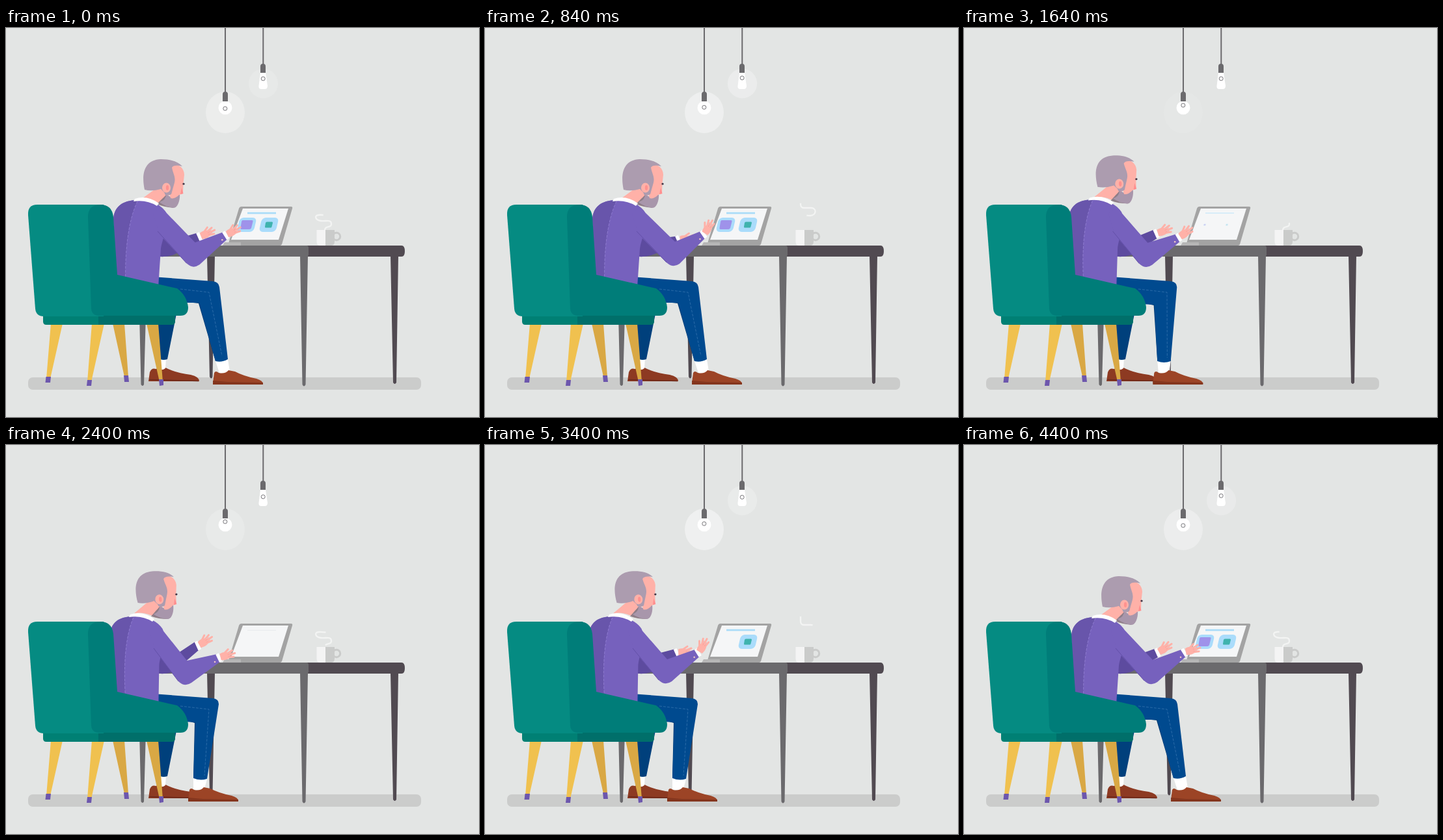
These frames come from a looping animation (727 by 599 pixels, 4.48 s). An HTML page:

```html
<!DOCTYPE html>
<html lang="en">
<head>
<meta charset="utf-8">
<title>Working at a laptop</title>
<style>
html, body { margin: 0; width: 100%; height: 100%; overflow: hidden; background: #e3e5e4; }
svg { display: block; width: 100vw; height: 100vh; }
.gray { fill: #6b6a6d; }
.dark { fill: #514a51; }
.skin { fill: #ffb1a8; }
.wool { fill: #7661bd; }
.wool2 { fill: #5d4b9f; }
.white { fill: #fff; }
.line { fill: none; }
</style>
</head>
<body>
<svg viewBox="0 0 727 599">
  <defs>
    <g id="hand" stroke="#ffb1a8" stroke-width="3" stroke-linecap="round">
      <path class="skin" stroke="none" d="M0 -5C5 -7 10 -6 13 -4L14 4C9 7 4 6 0 5Z"/>
      <path d="M5 -3L14 -9M9 -2L20 -6M10 0L23 -1M10 3L20 4"/>
      <path stroke="#f59a94" stroke-width=".7" d="M12 -1L18 -3M12 2L18 1.5"/>
    </g>
    <g id="icon" transform="skewX(-13)">
      <rect x="-13" y="-11" width="26" height="22" rx="6" fill="#aadcfb"/>
    </g>
  </defs>

  <rect x="34" y="538" width="604" height="19" rx="7" fill="#cbcccb"/>

  <!-- lamps -->
  <ellipse id="glowL" class="white" cx="337" cy="130" rx="30" ry="32"/>
  <circle id="glowR" class="white" cx="395.5" cy="85.5" r="22.7"/>
  <path stroke="#6b6a6d" stroke-width="2" d="M337 0V100M395.3 0V58"/>
  <path class="gray" d="M333 115V102Q333 98 337 98T341 102V115ZM391 70V59Q391 55 395 55T399 59V70Z"/>
  <path class="white" d="M333 113H341L345 116A10.5 10.5 0 1 1 329 116Z"/>
  <path class="white" d="M391 69H399L402 89Q402 94 398 94H392Q388 94 388.5 89Z"/>
  <g fill="none" stroke="#77767a"><circle id="ringL" cx="336.8" r="3"/><circle id="ringR" cx="395.2" r="3"/></g>

  <!-- table -->
  <path class="dark" d="M309 350H321L317.5 537Q315.500 542 313 537ZM591 350H603L600 546Q597.500 550 595 546Z"/>
  <path fill="#8d3a22" d="M219 544L221 530Q224 523 230 525L243 522Q260 531 284 534Q297 537 297 544Z"/>
  <path stroke="#6c2819" stroke-width="1.500" d="M220 541.500L296 543.500"/>
  <path class="white" d="M237 508H246L245 524Q240 528 235 525Z"/>
  <path fill="#00407c" d="M232 435H263L248 510Q242 512 237 510Z"/>
  <path class="dark" d="M460 335H608Q613 335 613 343.500T608 352H460Z"/>
  <path class="gray" d="M228 335H462Q465 335 465 339V348Q465 352 462 352H228ZM452 350H464L460.500 549Q458 554 455.500 549ZM205 440H215L212 549Q210 553 207.500 549Z"/>

  <!-- cup and steam -->
  <path id="steam" class="line" stroke="#f3f4f3" stroke-width="2.300" pathLength="121" d="M490 312C490 303 500 309 500 302C500 294 492 298 484 297C476 296 473 289 480 288C485 287 492 289 500 289C510 288 510 277 501 277H490Q485 277 485 271V264"/>
  <circle cx="508" cy="321" r="5.700" fill="none" stroke="#cacbca" stroke-width="3"/>
  <path fill="#cacbca" d="M490 311H505V329Q505 335 499 335H490Z"/>
  <path fill="#f4f4f4" d="M477.500 311H491V335H483Q477.500 335 477.500 329Z"/>

  <!-- laptop -->
  <path fill="#a3a3a3" d="M362 275H438Q441 275 440 278L424 333Q423 335 421 335H341L358 278Q359 275 362 275Z"/>
  <path fill="#f5f6f7" d="M364 278H434L419 326H346Z"/>
  <path fill="#b6b6b6" d="M336 330H361V335H333Z"/>
  <rect id="title" x="371" width="44"/>
  <g id="iconL"><use href="#icon"/><path fill="#9f92ea" d="M-6 -7H8Q10 -7 9.500 -5L7 5Q6 7 4 7H-8Q-10 7 -9.500 5L-8 -5Q-7.500 -7 -6 -7Z"/></g>
  <g id="iconR"><use href="#icon"/><path fill="#3fb3ae" d="M-3 -4.500H5Q6 -4.500 6 -3L4.500 3Q4 4.500 3 4.500H-5Q-6 4.500 -6 3L-5 -3Q-4.500 -4.500 -3 -4.500Z"/></g>

  <!-- far arm -->
  <path id="farArm" class="wool2"/>
  <path id="farCuff" class="white"/>
  <use id="farHand" href="#hand"/>

  <!-- near leg -->
  <path id="sock" class="white"/>
  <path id="shade" fill="#003b74"/>
  <path id="leg" fill="#004a8f"/>
  <path id="seam" class="line" stroke="#2a6aa8" stroke-dasharray="4 2"/>
  <g id="shoe">
    <path fill="#9c4426" d="M318 547L320 531Q322 527 327 531Q337 533 342 527L352 529Q365 536 385 540Q395 543 395 548Z"/>
    <path fill="#84351d" d="M318 543L341 545L395 546V549H342L341 549H318Z"/>
  </g>

  <!-- body -->
  <g id="torso">
    <path class="wool" d="M165 295C166 276 178 265 202 265C222 264 239 272 246 284C252 300 240 325 238 340L234 400H170Z"/>
    <path fill="#6855ab" d="M165 295C166 276 178 265 203 265C188 295 182 340 184 400H170Z"/>
    <path class="line" stroke="#8d7ace" stroke-dasharray="4 2" d="M202 267C188 296 182 345 184 400"/>
  </g>
  <g id="head">
    <path class="skin" d="M206 265L232 246L255 250L240 274Q222 262 206 265Z"/>
    <path fill="#8f7e88" d="M232 271L246 257L256 262L258 277Q243 276 232 271Z"/>
    <path fill="#a896ab" d="M246 256L256 262L267 256C268 264 264 278 257 277Q244 275 236 268Q246 265 246 256Z"/>
    <path class="skin" d="M250 212C262 206 274 214 274 226L272.500 240L272 255Q268 256 266 257Q259 264 253 262L250 250Z"/>
    <path fill="#ff8f8f" d="M270 246L272.500 255L268 256Z"/>
    <path fill="#ac9caf" d="M213 249C208 225 212 203 238 202C254 202 265 206 271 213C263 211 257 211 255 215C257 225 261 229 259 238L254 256Q247 260 241 254L238 248Q224 252 213 249Z"/>
    <ellipse class="skin" cx="246.500" cy="246" rx="6.500" ry="7.500"/>
    <ellipse fill="#ff928f" cx="248" cy="246" rx="2.200" ry="4"/>
    <path class="skin" d="M238 248L243 253Q246 258 242 261L230 265L222 256Z"/>
    <ellipse fill="#403344" cx="273" cy="240" rx="1.700" ry="1.500"/>
  </g>
  <path id="collar" class="white" d="M198 263Q217 257 235 270L232 274Q216 264 196 267Z"/>

  <!-- near arm -->
  <path id="arm" class="wool"/>
  <path id="armLine" class="line" stroke="#6350a8"/>
  <path id="cuff" class="white"/>
  <circle id="button" r="1.300" fill="#f1c9c2"/>
  <use id="hand1" href="#hand"/>

  <!-- chair -->
  <path fill="#f0c14f" d="M69 455H87L68 540H62ZM132 455H151L131 545H125Z"/>
  <path fill="#d9a844" d="M164 455H182L188 537H182ZM216 455H234L241 545H236Z"/>
  <path fill="#6d57ad" d="M61.500 537H69L68 546H60.500ZM125 542H132L131 551H124ZM181 535H188L189 545H182ZM235 541H242L242 550L236 551Z"/>
  <path fill="#008074" d="M57 441H144V457H62Q57 457 57 452Z"/>
  <path fill="#006f6a" d="M142 441H260V452Q260 457 255 457H142Z"/>
  <path fill="#058b82" d="M48 272H150V444H58Q46 444 45 432L34 288Q33 272 48 272Z"/>
  <path fill="#007d79" d="M145 272Q163 272 165 291L171 380L263 401Q278 412 280 430Q280 443 268 443H143Q132 443 131 432L126 291Q126 272 145 272Z"/>
</svg>
<script>
const LOOP = 4480, TAU = 2 * Math.PI;
const $ = id => document.getElementById(id);
const set = (id, name, value) => $(id).setAttribute(name, value);
const lerp = (a, b, k) => a + (b - a) * k;
const mix = (a, b, k) => a.map((v, i) => lerp(v, b[i], k));
const clamp = v => Math.min(1, Math.max(0, v));
const ramp = (t, from, to) => clamp((t - from) / (to - from));
const ease = k => k < .5 ? 4 * k ** 3 : 1 - 4 * (1 - k) ** 3;
const smooth = k => k * k * (3 - 2 * k);

// Linear track through [time, value] pairs
function track(t, keys) {
  const i = keys.findIndex(k => k[0] >= t);
  if (i < 0) return keys[keys.length - 1][1];
  if (!i) return keys[0][1];
  const [a, b] = [keys[i - 1], keys[i]];
  return lerp(a[1], b[1], (t - a[0]) / (b[0] - a[0]));
}

// Cuff and hand at a wrist; returns the sleeve's two end points
function wrist(cuff, hand, w, dir, r, angle) {
  const [c, s] = [Math.cos(dir), Math.sin(dir)];
  const at = (along, side) => [w[0] + along * c - side * s, w[1] + along * s + side * c];
  const tip = at(4, 0);
  set(cuff, 'd', `M${at(-1, -r)}L${at(4, -r)}L${at(4, r)}L${at(-1, r)}Z`);
  set(hand, 'transform', `translate(${tip}) rotate(${angle})`);
  return [at(0, -r), at(0, r), at(-7, 3)];
}

function drawArms(t, back) {
  const tap = Math.cos(TAU * (t - 840) / 640);
  const lift = Math.exp(-(((t - 3840) / 170) ** 2));

  const far = mix([296, 323.5 + 3.6 * tap], [293.5, 315 + 6 * tap], back);
  const [fa, fb] = wrist('farCuff', 'farHand', far, -.42, 7, -16 + 15 * tap);
  set('farArm', 'd', `M228 320L262 ${lerp(325, 322, back)}L${fa}L${fb}L258 349Q245 354 228 351Z`);

  const elbow = mix([288, 368], [276, 369], back);
  elbow[0] += tap + 8 * lift;
  elbow[1] -= tap + 6 * lift;
  const [ex, ey] = elbow;
  const w = mix([336 - 1.5 * tap, 319.5 - tap], [326, 324.5 - 4 * tap], back);
  w[0] += 2 * lift;
  w[1] -= 13 * lift;
  const dir = Math.atan2(w[1] - ey + 17, w[0] - ex);
  const [a, b, btn] = wrist('cuff', 'hand1', w, dir, 6.5, -34 - 23 * tap);
  const sx = lerp(243, 237, back);
  set('arm', 'd', `M${sx - 17} 286Q${sx - 4} 272 ${sx + 3} 284L${ex + 3} ${ey - 38}L${a}L${b}` +
    `L${ex + 10} ${ey - 4}Q${ex} ${ey + 3} ${ex - 9} ${ey - 5}L${sx - 7} 318Z`);
  set('armLine', 'd', `M${sx - 10} 313L${ex - 10} ${ey - 6}`);
  set('button', 'cx', btn[0]);
  set('button', 'cy', btn[1]);
}

function drawLeg(back) {
  const [inTop, inLow, outTop, outLow] = [
    [[297, 423], [291, 427]], [[322, 513], [288, 513]],
    [[328, 399], [327, 399]], [[341, 510], [309, 514]]
  ].map(([a, b]) => mix(a, b, back));
  const midLow = mix(inLow, outLow, .5);
  set('leg', 'd', `M225 383L318 390Q327 391 ${outTop}L${outLow}Q${midLow[0]} ${midLow[1] + 4} ${inLow}L${inTop}L225 423Z`);
  set('shade', 'd', `M262 420L${inTop[0] + 4} ${inTop[1] - 2}L${inLow[0] + 5} ${inLow[1] - 2}L${inLow}L${inTop[0] - 1} ${inTop[1] + 1}Z`);
  set('seam', 'd', `M268 402L312 407L${mix([332, 505], [305, 509], back)}`);
  set('sock', 'd', `M${inLow}L${outLow}L${mix([344, 529], [305, 530], back)}Q${mix([334, 534], [296, 533], back)} ${mix([328, 531], [288, 530], back)}Z`);
  set('shoe', 'transform', `translate(${-38 * back})`);
}

function drawScreen(t) {
  const shrink = smooth(ramp(t, 1380, 1720));
  const icon = (id, x, from) => {
    const k = t < 2240 ? 1 - shrink : smooth(ramp(t, from, from + 280));
    set(id, 'transform', `translate(${x} 303) scale(${k})`);
    set(id, 'opacity', clamp(k * 3));
  };
  icon('iconL', 370, 3500);
  icon('iconR', 404, 3080);
  const title = track(t, [[1350, 1], [1640, .4], [1900, .15], [2700, .15], [3100, 1]]);
  set('title', 'y', 285 - 1.4 * title);
  set('title', 'height', Math.max(1, 2.8 * title));
  set('title', 'fill', title > .3 ? '#aadcf8' : '#d4d9dd');
  set('title', 'opacity', clamp(title + .3));
}

function drawSteam(t) {
  const phase = t % 2240;
  const head = track(phase, [[0, 60], [160, 64], [840, 115], [1100, 121]]);
  const tail = track(phase, [[120, 0], [840, 67], [1160, 91], [1600, 120], [1640, 121]]);
  const next = track(phase, [[1440, 0], [1600, 15], [2160, 57], [2240, 60]]);
  const start = phase < 1440 ? 0 : next;
  set('steam', 'stroke-dasharray', `${start} ${Math.max(0, tail - start)} ${Math.max(0, head - tail)} 200`);
}

function drawLamps(t) {
  set('ringL', 'cy', 121 + 3 * Math.cos(TAU * t / LOOP));
  set('ringR', 'cy', 78.7 + 1.8 * Math.cos(TAU * (t - 3080) / LOOP));
  set('glowL', 'opacity', track(t, [[0, .3], [840, .38], [1200, .34], [1640, .08], [2000, .06], [2400, .18], [3400, .42], [4480, .3]]));
  set('glowR', 'opacity', track(t, [[0, .14], [840, .28], [1200, .2], [1600, 0], [2600, 0], [3400, .22], [4400, .2], [4480, .14]]));
}

function draw(now) {
  const t = now % LOOP;
  const back = ease(ramp(t, 1120, 2000)) - ease(ramp(t, 3560, 4360));
  set('torso', 'transform', `translate(0 ${-back}) matrix(1 0 ${.05 * back} 1 ${-19.6 * back} 0)`);
  set('head', 'transform', `translate(${-9 * back} ${-7.5 * back}) rotate(${-4 * back} 235 270)`);
  set('collar', 'transform', `translate(${-7 * back} ${-2 * back})`);
  drawArms(t, back);
  drawLeg(back);
  drawScreen(t);
  drawSteam(t);
  drawLamps(t);
}

const begin = performance.now();
function frame() {
  draw(performance.now() - begin);
  requestAnimationFrame(frame);
}
frame();
</script>
</body>
</html>
```
